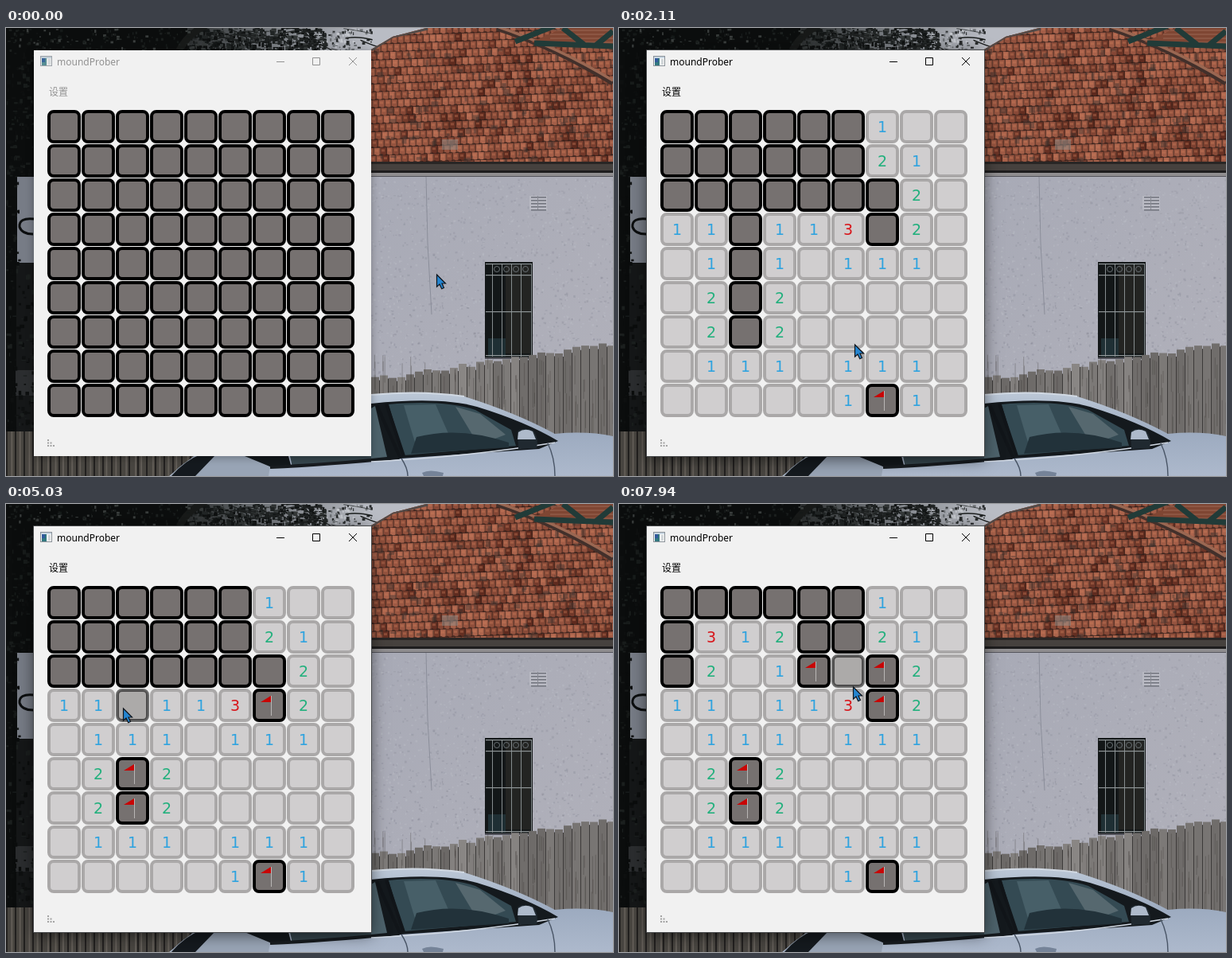
These frames come from a looping animation (763 by 563 pixels, 8000 ms). An HTML page with a canvas:

```html
<!DOCTYPE html>
<html lang="zh">
<head>
<meta charset="utf-8">
<style>
html, body { margin: 0; width: 100%; height: 100%; overflow: hidden; background: #0b0c0d; }
canvas { display: block; width: 763px; height: 563px; }
</style>
</head>
<body>
<canvas id="stage" width="763" height="563"></canvas>
<script>
const W = 763, H = 563, LOOP = 8000, STEP = 90.8;
const stage = document.getElementById('stage').getContext('2d');
const UI = '"Noto Sans", "Noto Sans CJK SC", sans-serif';
const CJK = '"Noto Sans CJK SC", "Noto Sans CJK", "Noto Sans", sans-serif';
const DIGITS = '"DejaVu Sans", sans-serif';
const DIGIT_COLOR = { 1: '#2fa3df', 2: '#22b07d', 3: '#d8181d' };

// Seeded random numbers keep the scenery identical on every load.
let seed = 11;
const rnd = () => (seed = (seed * 16807) % 2147483647) / 2147483647;
const between = (a, b) => a + (b - a) * rnd();

function shape(g, d, fill, stroke, width = 1) {
  const p = new Path2D(d);
  if (fill) { g.fillStyle = fill; g.fill(p); }
  if (stroke) { g.strokeStyle = stroke; g.lineWidth = width; g.stroke(p); }
}
function rect(g, x, y, w, h, fill) {
  g.fillStyle = fill;
  g.fillRect(x, y, w, h);
}
function clipped(g, d, draw) {
  g.save();
  g.clip(new Path2D(d));
  draw();
  g.restore();
}
function speckle(g, count, [x0, y0, x1, y1], size, colors) {
  for (let i = 0; i < count; i++)
    rect(g, between(x0, x1), between(y0, y1), between(1, size), between(1, size), colors[i % colors.length]);
}

// ---- Scenery ----
function drawTrees(g) {
  rect(g, 0, 0, 460, H, '#0b0d0d');
  const sky = g.createLinearGradient(230, 0, 460, 0);
  sky.addColorStop(0, '#2b2e2f');
  sky.addColorStop(.45, '#777b80');
  sky.addColorStop(1, '#b9bcc4');
  shape(g, 'M228 0H530L450 32H228Z', sky);
  speckle(g, 520, [228, 0, 400, 28], 6, ['#131616', '#202424', '#343838', '#0e1010']);
  speckle(g, 90, [390, 0, 460, 28], 4, ['#26292a', '#6d7175', '#c3c6cc']);
  for (let i = 0; i < 22; i++) {
    const x = between(235, 455), y = between(0, 28);
    shape(g, `M${x} ${y}q15 ${between(-12, 8)} 34 ${between(-9, 14)}`, null, '#1d2020', between(.7, 2));
  }
  shape(g, 'M218 28Q228 8 252 -4', null, '#171918', 9);
  speckle(g, 150, [0, 0, 230, 28], 4, ['#1b1f1e', '#151918', '#1b1f1e', '#3a3e3d']);

  speckle(g, 110, [0, 28, 35, 187], 6, ['#0e1010', '#181c1b']);
  rect(g, 14, 187, 21, 108, '#777c86');
  rect(g, 13, 295, 22, 212, '#151718');
  rect(g, 12, 430, 23, 32, '#2b2d2f');
  speckle(g, 110, [0, 295, 35, 507], 6, ['#0b0d0d', '#0e1010', '#1b1f1e']);
  speckle(g, 35, [0, 187, 16, 300], 5, ['#0b0d0d', '#161918']);
  shape(g, 'M35 240Q16 238 17 250Q20 259 34 259', null, '#0c0e0f', 3);
}

function drawRoof(g) {
  const outline = 'M459 27L486 11L528 0H763V171H459Z';
  shape(g, outline, '#8d523d');
  clipped(g, outline, () => {
    for (let y = -4, row = 0; y < 190; y += 10, row++) {
      for (let x = 450; x < 770; x += 8) {
        const lean = x + row * 3 % 8;
        const tone = between(-24, 22) - (rnd() < .08 + y / 700 ? 38 : 0);
        const top = y - (x - 450) * .035 + 5;
        rect(g, lean, top, 8, 11, `rgb(${154 + tone},${87 + tone * .75},${66 + tone * .6})`);
        rect(g, lean + 1, top + 2, 4, 3, 'rgba(203,124,91,.38)');
        shape(g, `M${lean} ${top + 9}q4 3 8 0`, null, 'rgba(38,25,22,.75)', 2.4);
        rect(g, lean + 6.5, top, 1.5, 9, 'rgba(50,32,27,.5)');
      }
    }
    speckle(g, 130, [460, 15, 763, 170], 9, ['rgba(50,43,41,.4)', 'rgba(70,57,51,.45)']);
    rect(g, 548, 140, 20, 13, 'rgba(145,137,132,.55)');
    shape(g, 'M617 0Q692 25 763 69', null, '#42302b', 7);
    shape(g, 'M617 -2Q692 23 763 66', null, '#9a6752', 3.5);
    shape(g, 'M459 27L486 10L530 0', null, '#514a48', 5);
  });
  shape(g, 'M660 18L700 0H763V24Z', '#7f4633');
  for (let y = 3; y < 24; y += 5) shape(g, `M684 ${y}H763`, null, '#a1705b', .8);
  shape(g, 'M640 17L690 -3M664 19L763 23M700 0L728 22M763 4L740 23', null, '#213b38', 7);
}

function drawWall(g) {
  const wall = g.createLinearGradient(459, 187, 763, 420);
  wall.addColorStop(0, '#a8aab6');
  wall.addColorStop(1, '#b0b0ba');
  rect(g, 459, 180, 304, 270, wall);
  for (let i = 0; i < 1700; i++) {
    const y = between(188, 440);
    rect(g, between(459, 763), y, between(1, 3), between(1, 3),
      i % 2 ? 'rgba(190,191,201,.35)' : `rgba(108,110,124,${.06 + y / 2400})`);
  }
  rect(g, 459, 168, 304, 3, '#292625');
  rect(g, 459, 171, 304, 8, '#46413e');
  rect(g, 459, 179, 304, 3, '#1e1d1e');
  rect(g, 459, 182, 304, 4, '#8f8d8f');
  rect(g, 459, 186, 304, 1, '#55555c');
  shape(g, 'M528 187L530 270L535 360', null, '#8b8e9a', 1);
  rect(g, 658, 211, 22, 17, '#b9bac3');
  for (let y = 212; y < 229; y += 4) rect(g, 660, y, 19, 1.5, '#70737c');
  rect(g, 668, 211, 1, 17, '#888b93');

  rect(g, 602, 294, 60, 122, '#131718');
  rect(g, 628, 298, 31, 111, '#232422');
  rect(g, 606, 390, 22, 23, '#1f2f34');
  for (const x of [611, 623, 635, 647, 660]) rect(g, x, 296, 1, 117, '#858c8e');
  for (const y of [296, 310, 356, 411]) rect(g, 603, y, 58, 1.2, '#8e9496');
  for (let x = 617; x < 660; x += 12) {
    g.strokeStyle = '#697074';
    g.beginPath();
    g.arc(x, 303, 3.5, 0, 7);
    g.stroke();
  }
  rect(g, 602, 414, 61, 2, '#53545c');
}

function drawFence(g) {
  for (let x = 459; x < 763; x += 11) {
    const tone = between(108, 137), top = 441 - (x - 459) * .148 + between(-3, 3);
    rect(g, x, top + 4, 12, 130, '#3c3a39');
    rect(g, x, top, 10, 130, `rgb(${tone},${tone - 3},${tone - 5})`);
    for (let i = 0; i < 4; i++)
      rect(g, x + between(1, 8), between(410, 490), 1, between(12, 50), 'rgba(55,51,48,.3)');
  }
  rect(g, 0, 507, 245, 56, '#484540');
  for (let x = 0; x < 245; x += 11) {
    rect(g, x, 507, 2, 56, '#22201f');
    rect(g, x + between(4, 8), 507, 2, 56, '#625d57');
  }
}

function drawCar(g) {
  const paint = g.createLinearGradient(0, 458, 0, 563);
  paint.addColorStop(0, '#bcc8d7');
  paint.addColorStop(.5, '#9dabc0');
  paint.addColorStop(1, '#adb9cc');
  shape(g, 'M205 563L246 530H440L459 461Q520 455 576 463Q640 483 690 510Q730 506 763 513V563Z', paint);
  shape(g, 'M207 563Q225 541 255 532H335L330 563Z', '#98a4b5');
  shape(g, 'M208 563Q225 543 247 535L264 536L238 563Z', '#14191e');
  shape(g, 'M300 538H355L358 549L334 552Z', '#12171b');
  shape(g, 'M357 538H470L475 542L360 552Z', '#36464d');
  shape(g, 'M332 552Q400 549 494 540', null, '#171b1f', 4);
  shape(g, 'M459 461Q520 455 576 463', null, '#d1d9e3', 2);
  shape(g, 'M459 472Q545 463 592 476Q654 495 694 519L670 529L496 541L459 543Z', '#14191d');
  shape(g, 'M459 478L464 475L479 539L459 541Z', '#4d626b');
  shape(g, 'M481 473Q550 467 590 480L635 505L641 525L500 537Z', '#344a53');
  shape(g, 'M500 474L540 473L565 530L518 534Z', '#475f68');
  shape(g, 'M565 476L596 485L628 511L594 524Z', '#56686f');
  shape(g, 'M516 514Q570 500 632 521L632 527L509 535Z', '#22323a');
  shape(g, 'M466 474L496 541M478 472L500 538', null, '#111519', 4);
  shape(g, 'M459 545Q580 539 690 521', null, '#d0d8e3', 1.5);
  shape(g, 'M497 541Q505 553 505 563M681 522Q690 540 690 563', null, '#495566', 1.4);
  shape(g, 'M643 507Q650 501 663 506Q670 515 667 528L644 529Z', '#202930');
  shape(g, 'M644 508Q652 502 662 507L666 517L643 517Z', '#aebacb');
  shape(g, 'M523 559Q532 554 550 559L549 563H525Z', '#758398');
}

const scenery = document.createElement('canvas');
scenery.width = W;
scenery.height = H;
const back = scenery.getContext('2d');
[drawTrees, drawRoof, drawWall, drawFence, drawCar].forEach(draw => draw(back));

// ---- Game: '.' covered, '_' empty, 'F' flag ----
const OPENED = [
  '......1__', '......21_', '.......2_', '11.113.2_', '_1.1_111_',
  '_2.2_____', '_2.2_____', '_111_111_', '_____1.1_'
];
const ACTIVE_AT = 915, OPEN_AT = 1005;
// time, first row, column, values by row
const MOVES = [
  [1830, 8, 6, 'F'], [2565, 3, 6, 'F'], [4035, 6, 2, 'F'], [4305, 5, 2, 'F'], [4765, 4, 2, '1'],
  [5295, 1, 1, '312'], [5295, 2, 1, '2_1'], [5295, 3, 2, '_'],
  [6110, 2, 4, 'F'], [7560, 2, 6, 'F']
];
// time, x, y of the pointer tip
const PATH = [
  [0, 541, 309], [60, 541, 309], [300, 440, 314], [470, 330, 319], [650, 262, 343], [830, 246, 338],
  [1110, 246, 338], [1220, 254, 348], [1640, 322, 457], [1920, 322, 464], [2100, 296, 400],
  [2300, 300, 320], [2480, 318, 256], [2660, 318, 253], [2920, 318, 219], [3110, 318, 212],
  [3290, 318, 211], [3380, 318, 211], [3600, 240, 300], [3790, 165, 399], [3900, 155, 377],
  [3970, 155, 377], [4220, 152, 338], [4350, 151, 333], [4550, 150, 306], [4800, 148, 298],
  [5000, 147, 256], [5120, 147, 255], [5400, 147, 255], [5800, 225, 224], [6020, 244, 212],
  [6220, 244, 212], [6560, 286, 213], [7260, 286, 213], [7480, 324, 212],
  [7650, 330, 216], [7910, 294, 229], [8000, 294, 229]
];

function pointerAt(t) {
  const i = PATH.findIndex(p => p[0] > t);
  const [t0, x0, y0] = PATH[i - 1], [t1, x1, y1] = PATH[i];
  const k = (t - t0) / (t1 - t0);
  return [Math.round(x0 + (x1 - x0) * k), Math.round(y0 + (y1 - y0) * k)];
}

function boardAt(t) {
  const board = OPENED.map(row => [...(t < OPEN_AT ? '.........' : row)]);
  for (const [at, row, col, values] of MOVES)
    if (t >= at) [...values].forEach((v, i) => board[row][col + i] = v);
  return board;
}

function text(g, value, x, y, font, color, align = 'left') {
  g.font = font;
  g.fillStyle = color;
  g.textAlign = align;
  g.fillText(value, x, y);
}

function drawWindow(g, active) {
  const ink = active ? '#000' : '#929292';
  g.save();
  g.shadowColor = active ? 'rgba(0,0,0,.55)' : 'rgba(0,0,0,.3)';
  g.shadowBlur = active ? 18 : 10;
  g.shadowOffsetY = active ? 4 : 2;
  rect(g, 35, 28, 424, 510, '#f1f1f1');
  g.restore();
  if (active) shape(g, 'M34.5 27.5H459.5V538.5H34.5Z', null, '#46484a');

  g.globalAlpha = active ? 1 : .8;
  rect(g, 43, 35, 15, 13, '#8b9299');
  rect(g, 44, 36, 13, 2, '#c9d7e2');
  rect(g, 44, 38, 13, 9, '#f7f8f8');
  rect(g, 45, 38, 6, 9, '#32777f');
  rect(g, 45, 38, 4, 5, '#315a9c');
  rect(g, 53, 39, 3, 7, '#d3d7da');
  g.globalAlpha = 1;

  text(g, 'moundProber', 64, 47, '12px ' + UI, ink);
  text(g, '设置', 54, 85, '12px ' + CJK, ink);
  shape(g, 'M340 42.5H350M385.5 37.5H394.5V46.5H385.5ZM431 37L441 47M441 37L431 47', null, ink);
  for (let r = 0; r < 3; r++)
    for (let c = 0; c <= r; c++) rect(g, 52 + c * 3.5, 517 + r * 3.5, 2, 2, '#a2a2a2');
}

function drawCell(g, x, y, value, hovered) {
  const covered = value === '.' || value === 'F';
  g.globalAlpha = value === '.' && hovered ? .55 : 1;
  g.beginPath();
  g.roundRect(x + 2, y + 2, 38, 38, 6);
  g.fillStyle = covered ? '#767170' : '#d0cecf';
  g.fill();
  g.strokeStyle = covered ? '#000' : '#aaa8a8';
  g.lineWidth = 4;
  g.stroke();
  g.globalAlpha = 1;
  if (value === 'F') {
    shape(g, `M${x + 23} ${y + 9}V${y + 17}H${x + 10}Z`, '#c80505');
    rect(g, x + 23, y + 9, 1, 25, '#b9b6b5');
  } else if (DIGIT_COLOR[value]) {
    text(g, value, x + 21, y + 28, '19px ' + DIGITS, DIGIT_COLOR[value], 'center');
  }
}

function drawPointer(g, x, y) {
  g.save();
  g.translate(x, y);
  shape(g, 'M.5 1V16.2L4 13L6.7 18.8L9.5 17.5L7 12H11.5Z', '#2585d0', '#10151c', 1.2);
  g.restore();
}

function render(t) {
  const [px, py] = pointerAt(t);
  stage.drawImage(scenery, 0, 0);
  drawWindow(stage, t >= ACTIVE_AT);
  boardAt(t).forEach((row, r) => row.forEach((value, c) => {
    const x = 52 + 43 * c, y = 103 + 43 * r;
    const hovered = px >= x && px < x + 42 && py >= y && py < y + 42;
    drawCell(stage, x, y, value, hovered);
  }));
  drawPointer(stage, px, py);
}

function tick(now) {
  const t = now % LOOP;
  render(t < 110 ? 0 : 110 + Math.floor((t - 110) / STEP) * STEP);
  requestAnimationFrame(tick);
}
render(0);
requestAnimationFrame(tick);
</script>
</body>
</html>
```
